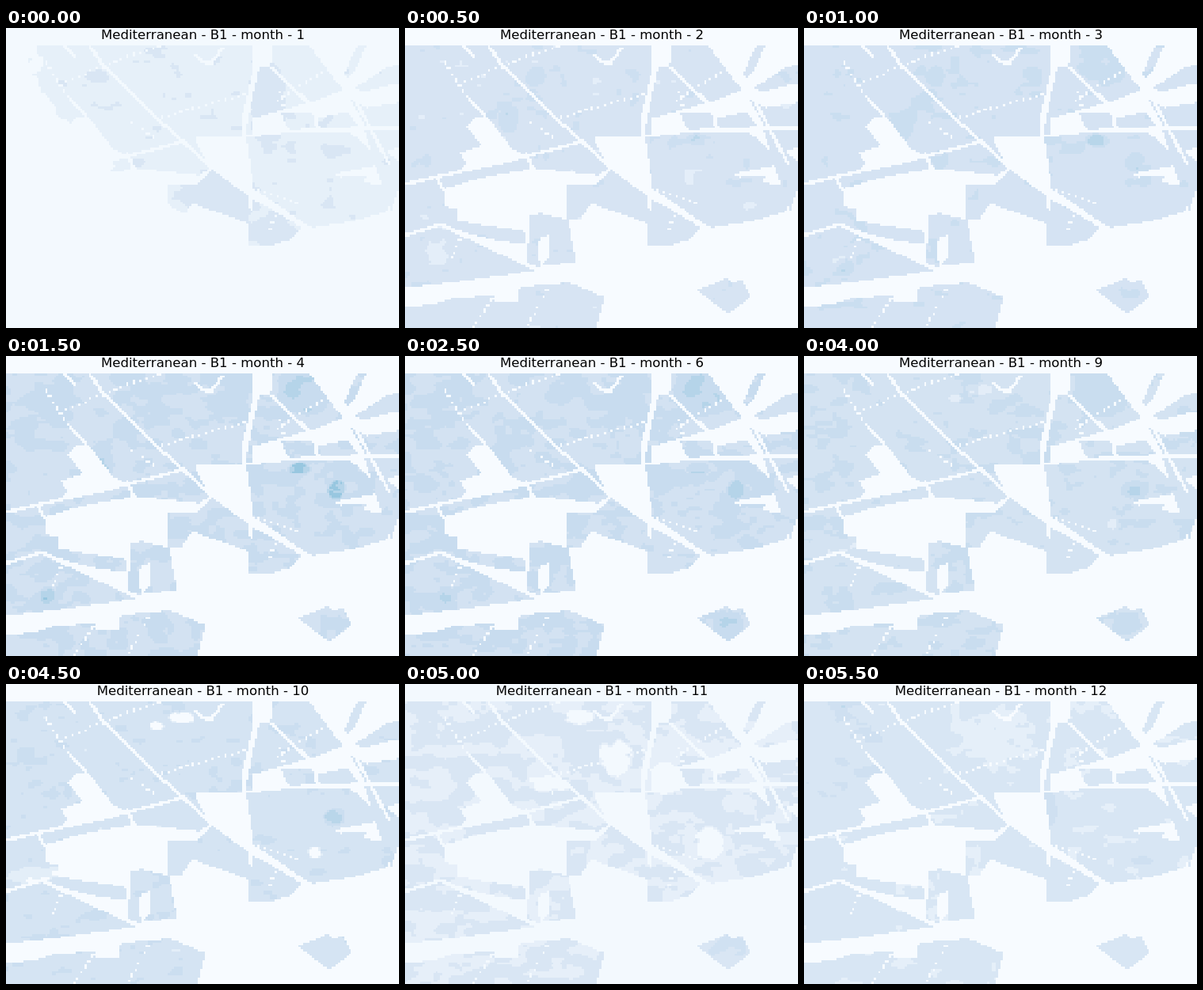
An HTML page with a canvas for the animation above (6000 ms loop, 496 by 379 pixels).

```html
<!DOCTYPE html>
<html>
<head>
<meta charset="utf-8">
<style>
html, body { margin: 0; width: 496px; height: 379px; overflow: hidden; }
canvas { position: absolute; left: 0; top: 22px; width: 496px; height: 357px; image-rendering: pixelated; }
svg { position: absolute; left: 0; top: 0; }
text { font: 16.58px "DejaVu Sans", sans-serif; text-anchor: middle; }
</style>
</head>
<body>
<canvas id="map" width="180" height="130"></canvas>
<svg width="496" height="22"><text id="title" x="248.5" y="14"></text></svg>
<script>
const W = 180, H = 130, CX = 496 / W, CY = 357 / H, TOP = 22;

const north = [
  '0,22 313,22 310,75 298,115 298,139 238,139 258,177 244,186 165,177 98,189 49,203 50,225 66,229 66,244 150,256 152,272 120,270 50,252 0,260',
  '204,198 238,197 258,177 307,213 307,247 235,222 222,241 204,241',
  '303,138 356,132 435,132 455,150 478,172 416,184 420,188 455,186 452,195 484,200 481,232 440,244 388,252 375,248 313,205',
  '306,213 345,235 374,252 360,267 330,276 305,275',
  '337,22 383,22 420,72 427,78 385,94 334,50',
  '319,50 335,50 381,95 312,114 312,135 301,136',
  '347,108 387,107 391,129 356,129', '392,114 432,106 445,124 397,129',
  '443,22 455,22 440,55 432,63 427,58', '497,45 480,50 438,77 455,80 497,70',
  '433,88 455,100 497,94 497,124 454,124',
  '452,130 497,128 497,150 480,156 497,168 497,200 486,232'
];
const south = [
  '0,262 45,250 165,306 135,311 60,321 0,328',
  '158,236 170,234 206,242 216,296 162,302 154,296',
  '0,352 40,348 60,341 112,337 112,347 142,346 145,327 208,321 252,340 242,379 0,379',
  '369,330 388,324 405,316 412,321 425,318 437,339 408,361 385,345'
];
const water = [
  '90,112 104,112 135,153 150,160 130,170 68,181 78,172 69,158 97,148 78,124',
  '170,264 182,262 182,290 172,300 168,290'
];
const roads = [
  '105,22 125,50 195,118 260,176 312,210', '317,22 315,50 299,115 299,138', '73,22 87,37',
  '0,197 40,188 130,168 225,143', '80,90 102,111', '335,50 381,95', '238,32 250,43 258,45 274,25',
  '343,108 356,130 497,126', '404,22 436,82 484,172', '153,158 161,178', '39,188 50,206',
  '0,262 45,248 170,306', '312,205 378,250', '309,190 309,230', '240,196 258,177'
];
const dotted = [
  '50,43 80,90', '75,68 155,35 200,22', '195,113 308,82', '157,118 187,138', '335,97 400,55',
  '318,205 370,223', '340,236 330,262', '72,258 60,292', '180,330 153,379', '110,342 85,379', '345,80 352,104'
];

// Per month: mean level, roughness, colour strength, notable patches as x,y,rx,ry,amount
const keys = {
  1: [.1, .5, .82, '330,95,25,70,.8 265,215,60,45,.7 335,265,40,30,.9 115,60,16,9,1'],
  2: [2.05, .65, .9, '165,62,14,14,1 132,118,14,20,1 368,141,11,9,1 40,285,15,20,-.9'],
  4: [2.45, .75, 1, '370,142,14,9,2.2 417,168,12,14,2.2 380,45,40,30,1 52,303,12,12,1.6 120,135,18,28,.8'],
  8: [2.5, .75, 1, '375,45,40,35,1 408,338,20,16,1.5 420,170,15,10,1 335,250,50,40,-.6'],
  10: [2.15, .65, .94, '222,42,18,9,-2.4 190,53,10,6,-2.2 415,168,16,12,1.4 390,213,10,9,-2 35,240,40,12,-1.3'],
  11: [1.55, .75, .83, '222,42,20,10,-2.5 265,95,22,25,-2.5 183,126,28,10,-2 328,118,18,22,-2.5 385,200,18,22,-2.5 408,338,34,24,1'],
  12: [1.8, .5, .86, '310,158,11,24,1.4 427,223,16,6,1.3 50,24,25,6,1 245,70,45,45,-.5 50,90,80,75,.5']
};
const shades = ['f7fbff', 'e2edf8', 'd3e2f2', 'c8dcef', 'b5d4e9', '98c7e0'].map(toRgb);
const frost = toRgb('f3f9fe');

function toRgb(hex) {
  const n = parseInt(hex, 16);
  return [n >> 16, n >> 8 & 255, n & 255];
}
const nums = s => s.split(' ').map(p => p.split(',').map(Number));
const mix = (a, b, t) => a + (b - a) * t;
const clamp = (v, lo, hi) => Math.max(lo, Math.min(hi, v));

function landMask() {
  const c = document.createElement('canvas');
  c.width = W;
  c.height = H;
  const g = c.getContext('2d');
  const draw = (list, how) => list.forEach(s => {
    g.beginPath();
    nums(s).forEach(p => g.lineTo(...p));
    g[how]();
  });
  g.setTransform(1 / CX, 0, 0, 1 / CY, 0, -TOP / CY);
  draw([...north, ...south], 'fill');
  g.globalCompositeOperation = 'destination-out';
  draw(water, 'fill');
  g.lineWidth = 3.8;
  draw(roads, 'stroke');
  g.lineWidth = 3.3;
  g.setLineDash([3.3, 5]);
  draw(dotted, 'stroke');
  const d = g.getImageData(0, 0, W, H).data;
  return i => d[i * 4 + 3] > 145;
}

const hash = (x, y, s) => {
  const v = Math.sin(x * 127.1 + y * 311.7 + s * 74.7) * 43758.5453;
  return (v - Math.floor(v)) * 2 - 1;
};
function noise(x, y, s) {
  const i = Math.floor(x), j = Math.floor(y), ease = t => t * t * (3 - 2 * t);
  const u = ease(x - i), v = ease(y - j);
  return mix(mix(hash(i, j, s), hash(i + 1, j, s), u), mix(hash(i, j + 1, s), hash(i + 1, j + 1, s), u), v);
}

function field(month) {
  const [base, rough, , list] = keys[month], spots = nums(list), out = new Float32Array(W * H);
  for (let i = 0; i < W * H; i++) {
    const x = (i % W + .5) * CX, y = TOP + (Math.floor(i / W) + .5) * CY;
    const fine = noise(x / 10, y / 6, month + 20);
    let v = base + rough * (.8 * noise(x / 24, y / 14, month) + .4 * fine);
    for (const [sx, sy, rx, ry, a] of spots) {
      const d = ((x - sx) / rx) ** 2 + ((y - sy) / ry) ** 2 + .35 * fine;
      if (d < 1) v += a * Math.min(1, 2 * (1 - d));
    }
    // In January growth stays north-east of a curved frost line
    if (month === 1) v += clamp((x - 25 - (y - TOP) ** 2 / 230) / 30, -2, 1.1);
    out[i] = v;
  }
  return out;
}

const land = landMask();
const known = Object.keys(keys).map(Number);
const fields = Object.fromEntries(known.map(k => [k, field(k)]));
const ctx = map.getContext('2d');

function render(month) {
  const lo = known.filter(k => k <= month).pop(), hi = known.find(k => k >= month);
  const t = hi > lo ? (month - lo) / (hi - lo) : 0;
  const strength = mix(keys[lo][2], keys[hi][2], t);
  const back = strength < .85 ? frost : shades[0];
  const pal = shades.map((c, n) => n ? c.map((v, k) => mix(shades[0][k], v, strength)) : back);
  const img = ctx.createImageData(W, H);
  for (let i = 0; i < W * H; i++) {
    const level = land(i) ? clamp(Math.round(mix(fields[lo][i], fields[hi][i], t)), 0, 5) : 0;
    img.data.set([...pal[level], 255], i * 4);
  }
  return { img, back: `rgb(${back})` };
}

const months = Array.from({ length: 12 }, (_, i) => render(i + 1));
const start = performance.now();
let shown = -1;
function tick() {
  const m = Math.floor((performance.now() - start) / 500) % 12;
  if (m !== shown) {
    shown = m;
    ctx.putImageData(months[m].img, 0, 0);
    document.body.style.background = months[m].back;
    title.textContent = 'Mediterranean - B1 - month - ' + (m + 1);
  }
  requestAnimationFrame(tick);
}
tick();
</script>
</body>
</html>
```
